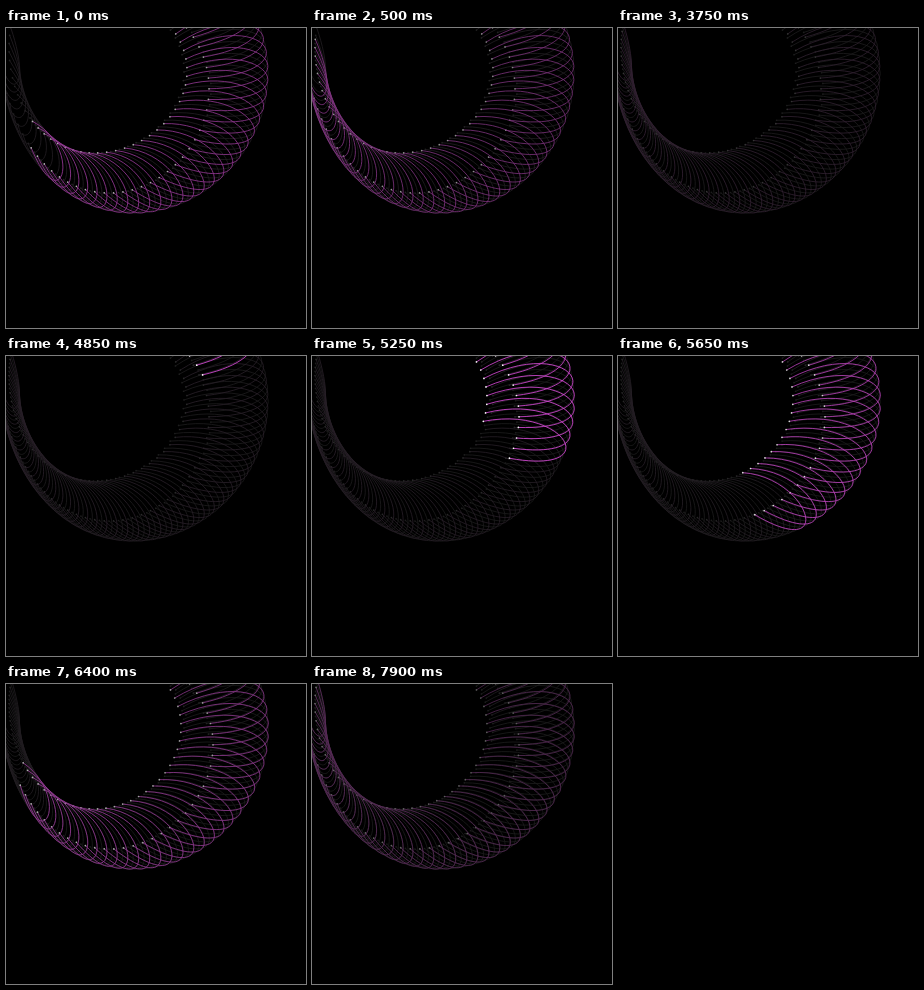
Animation, 300 px wide and 300 px high, one loop 8 s. Source, as an HTML page with a canvas:

```html
<!DOCTYPE html>
<html lang="en">
<head>
<meta charset="utf-8">
<title>Coiled ring</title>
<style>
  html, body { margin: 0; width: 100%; height: 100%; overflow: hidden; background: #000; }
  canvas { display: block; width: 100vw; height: 100vh; }
</style>
</head>
<body>
<canvas id="stage" width="300" height="300"></canvas>
<script>
const ctx = document.getElementById('stage').getContext('2d');
const LOOP = 8000, STEP = 50;
const FIRST = -15, LAST = 33;
const { cos, sin, exp, min, max, PI } = Math;

// Strand k of the coil: both ends and both handles ride on slow orbits.
// drift slides the ends a little from one pass to the next.
function strand(k, drift) {
  const kk = k * k;
  const ix = cos(.294 + .11 * k - .0005 * kk);
  const ox = cos(.426 + .104 * k - .0006 * kk);
  const h1 = .32 + .108 * k - .0012 * kk;
  const h2 = .37 + .093 * k - .0003 * kk;
  return [
    89 + 86 * ix + 6 * drift * max(0, ix), 41 + 84 * sin(.294 + .1035 * k),
    135 + 124 * cos(h1), 10 + 124 * sin(h1),
    148 + 158 * cos(h2), 60 + 166 * sin(h2),
    100 + 107 * ox - 4 * drift * max(0, ox), 58 + 107 * sin(.426 + .1 * k)
  ];
}

function mix(rest, fresh, f) {
  return 'rgb(' + fresh.map(v => rest + (v - rest) * f) + ')';
}

function dot(x, y) {
  ctx.beginPath();
  ctx.arc(x, y, .85, 0, 2 * PI);
  ctx.fill();
}

// One sweep along the ring; strand 0 appears at time start.
// The whole sweep dims together, its newer strands slightly less.
function pass(t, start, drift, offset = 0) {
  for (let k = FIRST + offset; k <= LAST; k++) {
    const since = t - start;
    if (since < k * STEP) break;
    const glow = min(1, exp((10 * k - since) / 2100));
    const [x0, y0, x1, y1, x2, y2, x3, y3] = strand(k, drift);
    ctx.strokeStyle = mix(28, [215, 72, 215], glow);
    ctx.fillStyle = mix(28, [255, 255, 255], glow);
    ctx.beginPath();
    ctx.moveTo(x0, y0);
    ctx.bezierCurveTo(x1, y1, x2, y2, x3, y3);
    ctx.stroke();
    dot(x0, y0);
    dot(x3, y3);
  }
}

function draw(now) {
  const t = now % LOOP;
  ctx.fillStyle = '#000';
  ctx.fillRect(0, 0, 300, 300);
  ctx.lineWidth = .85;
  pass(t, -7350, .5, .5);
  pass(t, -1050, 1);
  pass(t, 5250, 0);
  requestAnimationFrame(draw);
}
requestAnimationFrame(draw);
</script>
</body>
</html>
```
